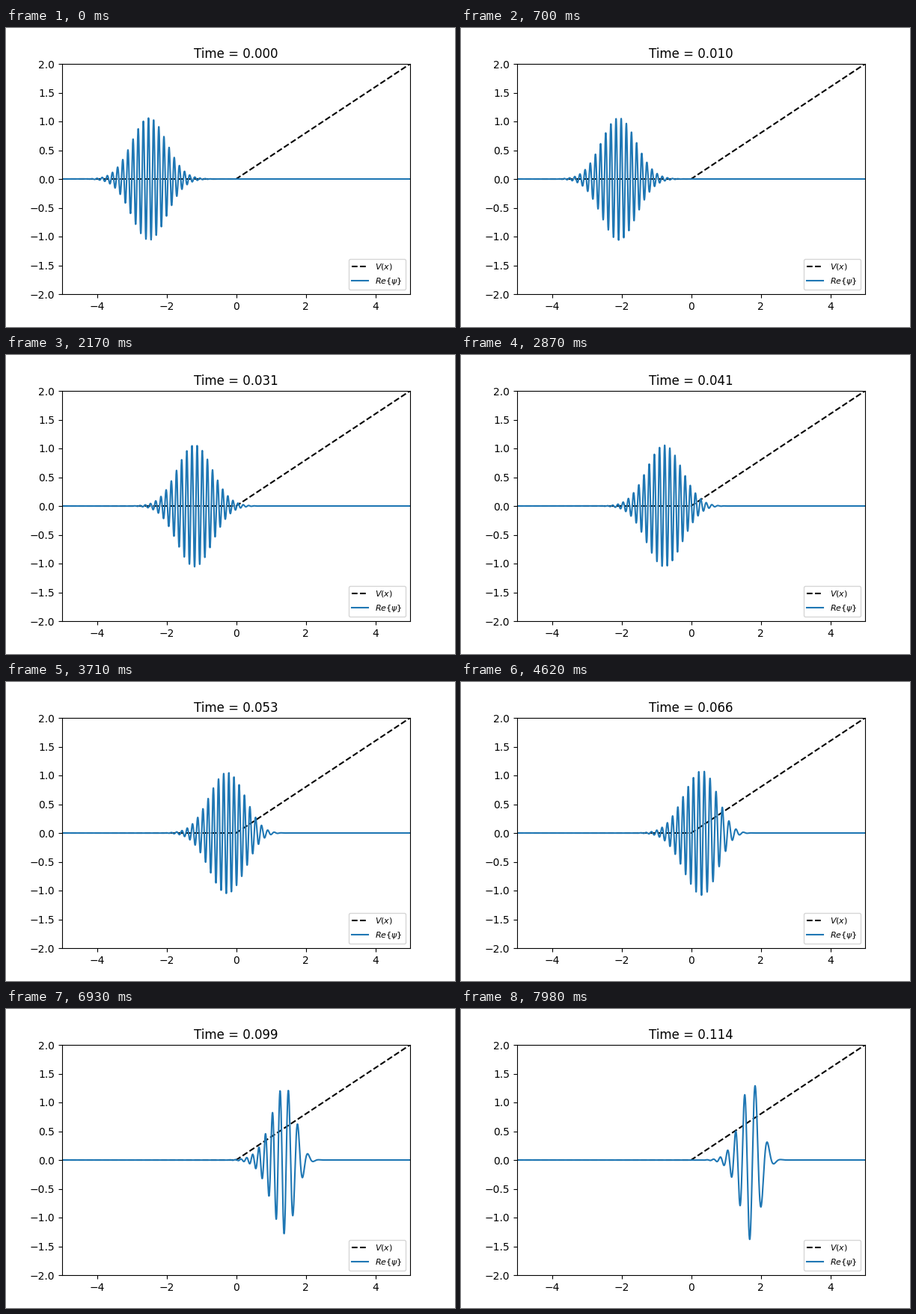
Animation of 600 by 400 pixels, one loop 8 s. Source, as a matplotlib script:

```python
import numpy as np
import matplotlib.pyplot as plt
from matplotlib.animation import FuncAnimation

# Wave packet running up a linear ramp (hbar = m = 1)
SIGMA, X0, ENERGY, SLOPE = 0.5, -2.5, 900.0, 400.0
DX, HALF = 0.004, 5.0
DT, SUBSTEPS = 0.001, 40
INTERVAL, LOOP, HOLD = 20, 8000, 70   # ms

x = np.arange(-HALF, HALF + DX / 2, DX)
V = SLOPE * np.clip(x, 0, None)


def evolve(count):
    """Real part of psi at `count` times DT apart, by split-step Fourier."""
    k0 = np.sqrt(2 * ENERGY)
    norm = 1 / np.sqrt(SIGMA * np.sqrt(np.pi))
    psi = norm * np.exp(-(x - X0) ** 2 / (2 * SIGMA ** 2) + 1j * k0 * x)
    psi = psi[:-1]

    k = 2 * np.pi * np.fft.fftfreq(psi.size, DX)
    kinetic = (1 - np.cos(k * DX)) / DX ** 2   # three-point Laplacian
    dt = DT / SUBSTEPS
    half_v = np.exp(-0.5j * V[:-1] * dt)
    full_t = np.exp(-1j * kinetic * dt)

    states = []
    for _ in range(count):
        states.append(np.append(psi.real, psi[0].real))
        for _ in range(SUBSTEPS):
            psi = half_v * np.fft.ifft(full_t * np.fft.fft(half_v * psi))
    return states


waves = evolve(LOOP // HOLD + 1)

fig, ax = plt.subplots(figsize=(6, 4), dpi=100)
ax.plot(x, V / 1000, "k--", label=r"$V(x)$")
line, = ax.plot(x, waves[0], color="tab:blue", label=r"$Re\{\psi\}$")
title = ax.set_title("Time = 0.000")
ax.set_xlim(-HALF, HALF)
ax.set_ylim(-2, 2)
ax.legend(loc="lower right", fontsize=8)


def update(i):
    step = (i * INTERVAL + INTERVAL // 2) // HOLD
    line.set_ydata(waves[step])
    title.set_text(f"Time = {step * DT:.3f}")
    return line, title


anim = FuncAnimation(fig, update, frames=LOOP // INTERVAL, interval=INTERVAL,
                     repeat=True, repeat_delay=0, blit=False)
plt.show()
```
